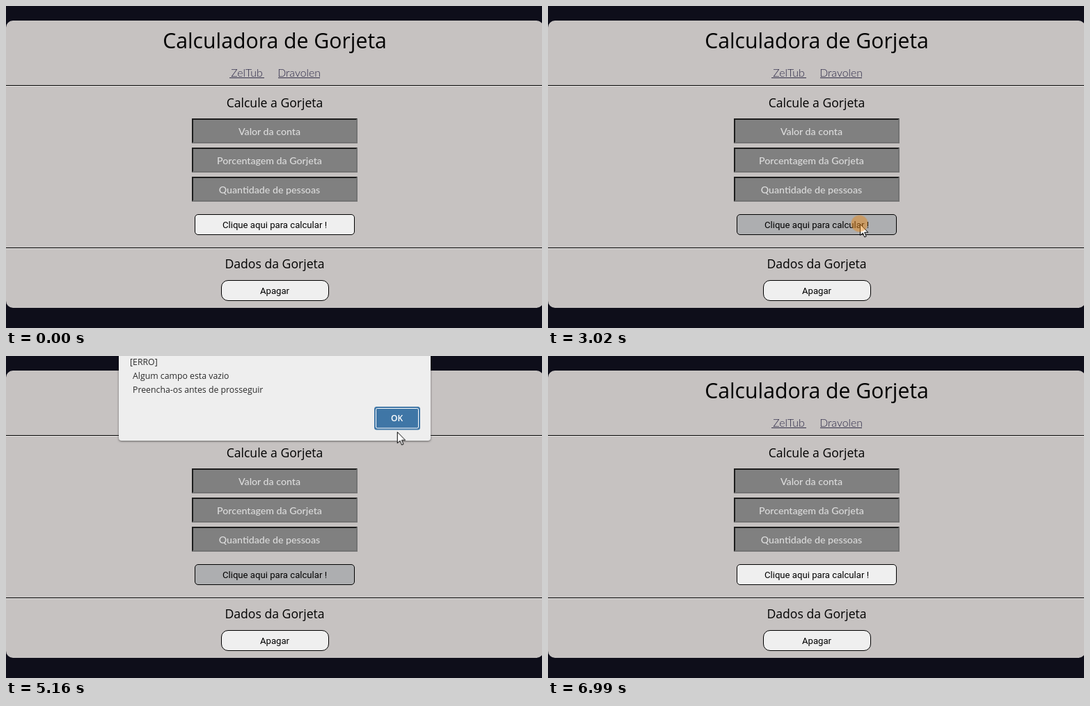
An HTML page that plays this animation: 770x464 px, repeating every 7850 ms.

```html
<!DOCTYPE html>
<html lang="pt">
<head>
<meta charset="utf-8">
<title>Calculadora de Gorjeta</title>
<style>
  html, body { margin: 0; width: 100%; height: 100%; overflow: hidden; background: #0e0e1a; }
  #stage { position: absolute; left: 0; top: 0; width: 770px; height: 464px; overflow: hidden; }
  svg { position: absolute; left: 0; top: 0; overflow: visible; }
  .mid { text-anchor: middle; }
  .head { font: 17.6px "Open Sans", "Noto Sans", sans-serif; }
  .title { font-size: 30.2px; }
  .link { font: 300 15.8px Lato, sans-serif; fill: #2e2a48; }
  .field { font: 500 14.2px Lato, sans-serif; fill: #dcdcdc; }
  .btn { font: 13.15px Roboto, sans-serif; }
  .box { fill: #efefef; stroke: #000; }
  .msg { font: 12.3px "Open Sans", "Noto Sans", sans-serif; fill: #2c2c2c; }
  .ok { font: 600 12px "Open Sans", "Noto Sans", sans-serif; fill: #fff; }
  #dialog {
    position: absolute; left: 162px; top: -60px; width: 448px; height: 182px;
    transform-origin: 50% 60px; border-radius: 4px; background: #eee;
    box-shadow: 0 1px 3px rgba(0, 0, 0, .5); opacity: 0;
  }
  #dialog svg { left: -162px; top: 60px; }
</style>
</head>
<body>
<div id="stage">
  <svg width="770" height="464">
    <rect y="21" width="772" height="414" rx="10" fill="#c6c2c1"/>
    <text class="head title mid" x="386" y="61">Calculadora de Gorjeta</text>
    <text class="link mid" x="346" y="102">ZelTub</text>
    <text class="link mid" x="421" y="102">Dravolen</text>
    <path d="M321 103.5h50M391 103.5h60" stroke="#35324a"/>
    <path d="M0 114.5h770M0 348.5h770" stroke="#000"/>
    <path d="M0 115.5h770M0 349.5h770" stroke="#e6e4e3"/>
    <text class="head mid" x="386" y="146">Calcule a Gorjeta</text>
    <g id="fields"></g>
    <rect id="calc" class="box" x="271.5" y="300.5" width="229" height="29" rx="4.5"/>
    <text class="btn mid" x="386" y="320">Clique aqui para calcular !</text>
    <text class="head mid" x="386" y="378">Dados da Gorjeta</text>
    <rect class="box" x="309.5" y="395.5" width="154" height="29" rx="9.5"/>
    <text class="btn mid" x="386" y="415">Apagar</text>
  </svg>

  <div id="dialog">
    <svg width="770" height="464">
      <text class="msg" x="178" y="13">[ERRO]</text>
      <text class="msg" x="182" y="33">Algum campo esta vazio</text>
      <text class="msg" x="182" y="53">Preencha-os antes de prosseguir</text>
      <g id="ok" fill="#3f76a6">
        <rect x="529" y="73" width="66" height="33.5" rx="3.5"/>
        <rect x="531.5" y="75.5" width="61" height="28.5" rx="2" stroke="#fff"/>
      </g>
      <text class="ok mid" x="561.5" y="94">OK</text>
    </svg>
  </div>

  <svg width="770" height="464">
    <g id="cursor" opacity="0">
      <path d="M.5 .5V16.5L4.2 13L6.8 19L9.2 18L6.7 12.2H11.8Z" fill="#fff" stroke="#000"/>
    </g>
    <circle id="tap" r="12" fill="#e6871a" fill-opacity=".5" opacity="0"/>
  </svg>
</div>

<script>
const LOOP = 7850;
const $ = id => document.getElementById(id);

$('fields').innerHTML = ['Valor da conta', 'Porcentagem da Gorjeta', 'Quantidade de pessoas']
  .map((label, i) => `<g transform="translate(267 ${162 + i * 42})">
    <rect width="238" height="36" fill="#808080"/>
    <path d="M0 36V0H238L236 2H2V34Z" fill="#1d1d1d"/>
    <path d="M0 36H238V0L236 2V34H2Z" fill="#737373"/>
    <text class="field mid" x="111.5" y="23.5">${label}</text></g>`).join('');

// Rows are [ms, value, easing to the next row].
function track(id, prop, rows, easing = 'linear') {
  const all = [...rows];
  if (all[0][0] > 0) all.unshift([0, all[0][1]]);
  all.push([LOOP, all[all.length - 1][1]]);
  $(id).animate(
    all.map(([t, v, e]) => ({ offset: t / LOOP, [prop]: v, easing: e || easing })),
    { duration: LOOP, iterations: Infinity });
}
const HOLD = 'steps(1, end)';
const steps = (id, prop, rows) => track(id, prop, rows, HOLD);
const at = (x, y) => `translate(${x}px, ${y}px)`;
const tilt = (y, deg) => `perspective(600px) translateY(${y}px) rotateX(${deg}deg)`;

track('cursor', 'transform', [
  [290, at(558, 462), 'ease-in-out'],
  [1060, at(513, 352)],
  [1080, at(513, 352), 'ease-out'],
  [1250, at(505, 346)],
  [1640, at(505, 346), 'ease-in'],
  [1830, at(492, 333), 'ease-out'],
  [2410, at(448, 314)],
  [4540, at(448, 314)],
  [4560, at(446, 309), 'ease-in'],
  [4860, at(510, 205)],
  [5060, at(552, 130), 'ease-out'],
  [5240, at(565, 102), 'ease-in-out'],
  [5340, at(554, 94)],
  [5350, at(554, 94), 'ease-out'],
  [5520, at(565, 85)],
  [6420, at(565, 85), 'ease-in-out'],
  [6990, at(576, 461)]
]);
steps('cursor', 'opacity', [[0, 0], [300, 1], [6990, 0]]);

steps('tap', 'transform', [[0, at(447.5, 313.5)], [5000, at(565, 85)]]);
steps('tap', 'opacity', [[0, 0], [3020, 1], [3150, 0], [6190, 1], [6310, 0]]);

steps('calc', 'fill', [[0, '#efefef'], [1880, '#adaeb0'], [6310, '#efefef']]);
steps('ok', 'fill', [[0, '#3f76a6'], [6190, '#4680b3']]);

track('dialog', 'opacity', [[3150, 0], [3230, 1], [6290, 1], [6420, 0]]);
track('dialog', 'transform', [
  [3150, tilt(-21, 7), 'cubic-bezier(.33, .67, .67, 1)'],
  [3330, tilt(0, 0)],
  [6290, tilt(0, 0), 'ease-in'],
  [6420, tilt(-14, 4)]
]);
</script>
</body>
</html>
```
